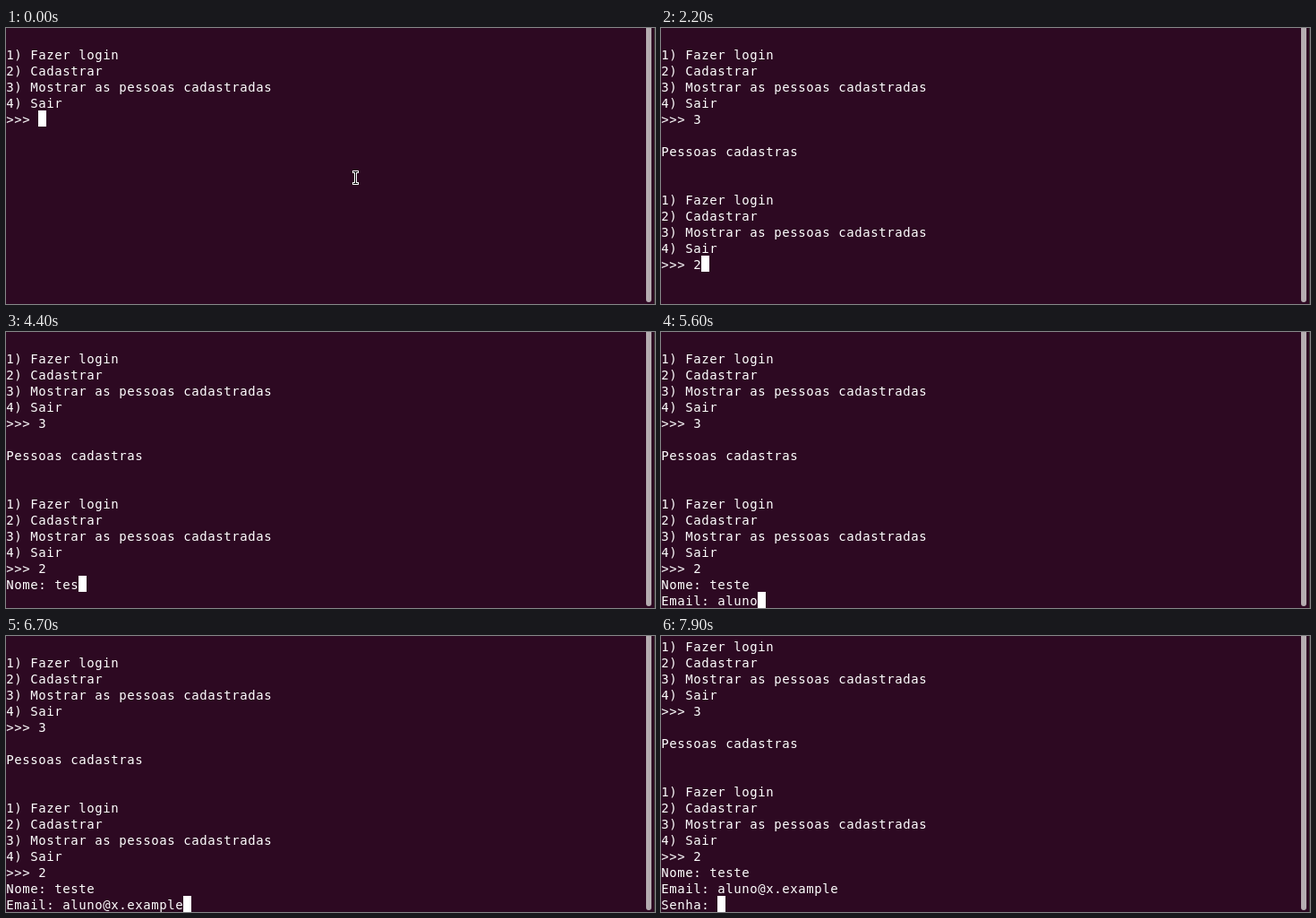
Write an HTML page that moves like this. It is 725x308 px and loops after 8 s.

```html
<!DOCTYPE html>
<html lang="pt">
<head>
<meta charset="utf-8">
<title>Terminal</title>
<style>
  html, body { margin: 0; width: 100%; height: 100%; overflow: hidden; background: #2d0922; }
  svg { display: block; width: 725px; height: 308px; }
  text { font: 14px "DejaVu Sans Mono", monospace; letter-spacing: 0.572px; fill: #fff; white-space: pre; }
</style>
</head>
<body>
<svg viewBox="0 0 725 308">
  <rect width="725" height="308" fill="#2d0922"/>
  <g id="screen"></g>
  <rect id="cursor" width="9" height="18" fill="#fff"/>
  <g id="pointer" fill="none" stroke-linecap="square">
    <path d="M388.5 160.5h4M390.5 160.5v13M388.5 173.5h4" stroke="#fff" stroke-width="3"/>
    <path d="M388.5 160.5h4M390.5 160.5v13M388.5 173.5h4" stroke="#000" stroke-width="1"/>
  </g>
  <rect x="715" y="-6" width="6" height="312" rx="3" fill="#b5adb1"/>
  <rect x="724" width="1" height="308" fill="#3c3b37"/>
</svg>
<script>
const LOOP = 8000, COL = 9, ROW = 18, TOP = 2, BASE = 15, ROWS = 17;
const MENU = ["1) Fazer login", "2) Cadastrar", "3) Mostrar as pessoas cadastradas", "4) Sair"];

// Each prompt: time it appears, lines above it, its label, the answer,
// and [time, characters typed so far].
const PROMPTS = [
  { at: 0, above: ["", ...MENU], label: ">>> ", answer: "3", keys: [[700, 1]] },
  { at: 1200, above: ["", "Pessoas cadastras", "", "", ...MENU], label: ">>> ", answer: "2", keys: [[2200, 1]] },
  { at: 2800, above: [], label: "Nome: ", answer: "teste",
    keys: [[4000, 1], [4100, 2], [4400, 3], [4500, 5]] },
  { at: 4800, above: [], label: "Email: ", answer: "aluno@x.example",
    keys: [[5100, 1], [5200, 2], [5300, 4], [5600, 5], [5700, 6], [5900, 7],
           [6100, 9], [6300, 11], [6500, 12], [6600, 14], [6700, 15]] },
  { at: 6800, above: [], label: "Senha: ", answer: "", keys: [] }
];
const CURSOR_OFF = [[300, 400], [1700, 1900], [3300, 3400], [7400, 7900]];
const POINTER_GONE = 400;

const byId = id => document.getElementById(id);
const screen = byId("screen"), cursor = byId("cursor"), pointer = byId("pointer");
const show = (el, on) => el.setAttribute("visibility", on ? "visible" : "hidden");

const rows = Array.from({ length: ROWS }, (_, i) => {
  const el = document.createElementNS("http://www.w3.org/2000/svg", "text");
  el.setAttribute("x", 0.3);
  el.setAttribute("y", TOP + ROW * i + BASE);
  return screen.appendChild(el);
});

function linesAt(t) {
  const lines = [];
  for (const p of PROMPTS) {
    if (t < p.at) break;
    const typed = p.keys.reduce((n, [time, count]) => t >= time ? count : n, 0);
    lines.push(...p.above, p.label + p.answer.slice(0, typed));
  }
  return lines;
}

function draw(t) {
  const lines = linesAt(t).slice(-ROWS);
  rows.forEach((el, i) => {
    const line = lines[i] || "";
    if (el.textContent !== line) el.textContent = line;
  });
  const last = lines.length - 1;
  cursor.setAttribute("x", lines[last].length * COL);
  cursor.setAttribute("y", TOP + last * ROW);
  show(cursor, !CURSOR_OFF.some(([from, to]) => t >= from && t < to));
  show(pointer, t < POINTER_GONE);
}

const start = performance.now();
function tick() {
  draw((performance.now() - start) % LOOP);
  requestAnimationFrame(tick);
}
tick();
</script>
</body>
</html>
```
